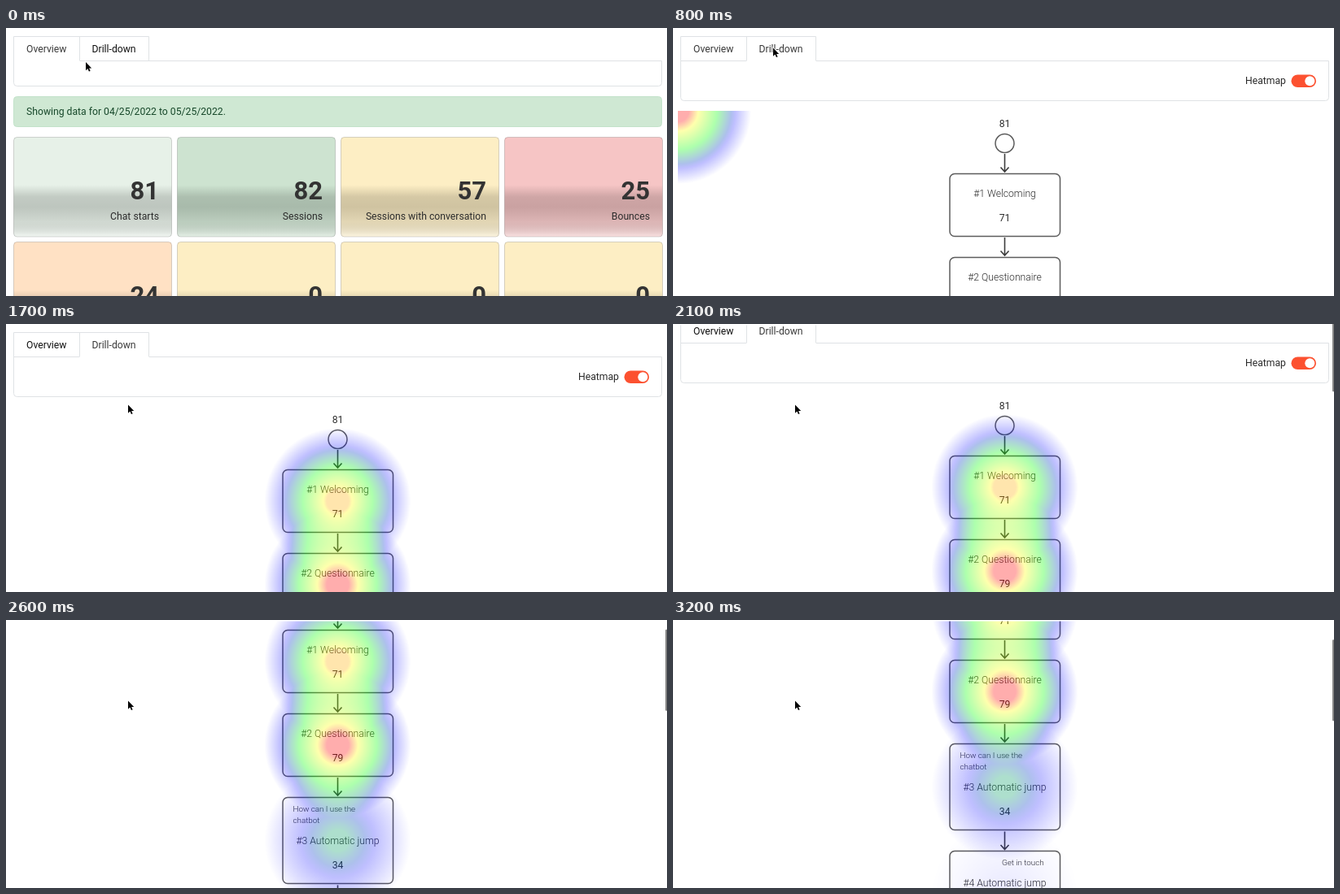
Animation of 812x330 px, one loop 3.3 s. Source, as an HTML page with a canvas:

```html
<!DOCTYPE html>
<html lang="en">
<head>
<meta charset="utf-8">
<title>Chat dashboard</title>
<style>
  html, body { margin: 0; width: 100%; height: 100%; overflow: hidden; background: #fff; }
  #stage { position: relative; width: 812px; height: 330px; overflow: hidden; background: #fff; }
  #page, #page > *, #top { position: absolute; left: 0; top: 0; }
  text { font-family: Roboto, sans-serif; font-size: 12.2px; fill: #2b2b2b; }
  .num { font-size: 31px; font-weight: 700; fill: #333; }
  .step { font-weight: 300; }
  .note { font-size: 9.8px; font-weight: 300; }
  .line { fill: none; stroke: #dfe2e5; }
  .node { fill: none; stroke: #5c5c5c; stroke-width: 1.5; }
  .arrow { fill: none; stroke: #3c3c3c; stroke-width: 1.6; }
</style>
</head>
<body>
<div id="stage">
  <div id="page">
    <svg id="art" width="812" height="640">
      <defs>
        <linearGradient id="shade" x1="0" y1="0" x2="0" y2="1">
          <stop offset=".48" stop-color="#000" stop-opacity="0"/>
          <stop offset=".6" stop-color="#000" stop-opacity=".16"/>
          <stop offset=".7" stop-color="#000" stop-opacity=".18"/>
          <stop offset=".85" stop-color="#777" stop-opacity=".2"/>
          <stop offset="1" stop-color="#fff" stop-opacity=".5"/>
        </linearGradient>
      </defs>
      <path class="line" d="M9.5 40V10.5H175.5V40M90.5 10.5V40"/>
      <path id="panel" class="line"/>
      <text id="tabA" x="25" y="30">Overview</text>
      <text id="tabB" x="105.5" y="30">Drill-down</text>
      <g id="overview"></g>
      <g id="drill"></g>
    </svg>
  </div>
  <svg id="top" width="812" height="330">
    <rect id="edge" width="812" height="1.5" fill="#fff"/>
    <rect id="bar" x="810" width="3" height="100" rx="1" fill="#858585"/>
    <path id="cursor" d="M0 0V10.2L2.4 8L3.9 11.6L5.6 10.9L4.1 7.4H7.2Z"
      fill="#000" stroke="#fff" stroke-width="1.4" paint-order="stroke"/>
  </svg>
</div>
<script>
const $ = id => document.getElementById(id);
const LOOP = 3300, STEP = 100, MID = 407.5;
const SCROLL = [17, 44, 74, 105, 138, 167, 191, 210, 220, 227, 231, 233];

const label = (x, y, s, cls = '', anchor = 'start') =>
  `<text x="${x}" y="${y}" class="${cls}" text-anchor="${anchor}">${s}</text>`;

function card(col, row, fill, n, name) {
  const x = 9.5 + col * 201, y = 134.5 + row * 129;
  const box = `x="${x}" y="${y}" width="194" height="122.5" rx="4"`;
  return `<rect ${box} fill="${fill}"/><rect ${box} fill="url(#shade)" stroke="#000" stroke-opacity=".16"/>`
    + label(x + 178.5, y + 76, n, 'num', 'end') + label(x + 178.5, y + 101.5, name, '', 'end');
}

const yellow = '#fdeec4';
$('overview').innerHTML =
  '<rect x="9.5" y="84.5" width="796" height="37" rx="4" fill="#cfe8d3" stroke="#c3e2ca"/>'
  + label(25, 107, 'Showing data for 04/25/2022 to 05/25/2022.').replace('<text', '<text style="fill:#17482a"')
  + card(0, 0, '#e7f1e8', 81, 'Chat starts')
  + card(1, 0, '#cde3d0', 82, 'Sessions')
  + card(2, 0, yellow, 57, 'Sessions with conversation')
  + card(3, 0, '#f6c5c5', 25, 'Bounces')
  + card(0, 1, '#ffe1c4', 24, '')
  + [1, 2, 3].map(c => card(c, 1, yellow, 0, '')).join('');

const center = (y, s, cls) => label(MID, y + 4.3, s, cls, 'middle');
const node = (y, h) => `<rect class="node" x="340" y="${y}" width="135.5" height="${h}" rx="6"/>`;
const arrow = y => `<path class="arrow" d="M${MID} ${y}v22m-5 -5.5l5 5.5l5 -5.5"/>`;

$('drill').innerHTML =
  label(703, 69.3, 'Heatmap')
  + '<rect x="759.5" y="57.5" width="30.5" height="15.5" rx="7.75" fill="#fc5130"/>'
  + '<circle cx="782.3" cy="65.2" r="6" fill="#fff"/>'
  + center(117.5, 81)
  + `<circle class="node" cx="${MID}" cy="142" r="11.5"/>`
  + [155, 258, 361, 493.5].map(arrow).join('')
  + node(179.5, 77) + center(203.5, '#1 Welcoming', 'step') + center(234, 71)
  + node(282.5, 77) + center(307, '#2 Questionnaire', 'step') + center(337, 79)
  + node(385.5, 106) + label(352.5, 402.5, 'How can I use the', 'note') + label(352.5, 417, 'chatbot', 'note')
  + center(439, '#3 Automatic jump', 'step') + center(469, 34)
  + node(517.5, 106) + label(404, 535, 'Get in touch', 'note')
  + center(556.5, '#4 Automatic jump', 'step');

// Heat layer: soft discs add up as alpha, then alpha picks the colour.
const RAMP = [[.25, 0, 0, 255], [.55, 0, 255, 0], [.85, 255, 255, 0], [1, 255, 0, 0]];
function heatColour(a) {
  if (a <= RAMP[0][0]) return RAMP[0].slice(1);
  const i = RAMP.findIndex(s => a <= s[0]);
  const lo = RAMP[i - 1], hi = RAMP[i], p = (a - lo[0]) / (hi[0] - lo[0]);
  return [1, 2, 3].map(k => lo[k] + (hi[k] - lo[k]) * p);
}

function heatLayer(points) {
  const R = 90, LEFT = 6, TOP = 102, MAX = 79, OPACITY = .32;
  const c = document.createElement('canvas');
  c.width = 802;
  c.height = 538;
  c.style.left = LEFT + 'px';
  c.style.top = TOP + 'px';
  const g = c.getContext('2d');
  for (const [px, py, v] of points) {
    const x = px - LEFT, y = py - TOP;
    const disc = g.createRadialGradient(x, y, R * .15, x, y, R);
    disc.addColorStop(0, 'rgba(0,0,0,1)');
    disc.addColorStop(1, 'rgba(0,0,0,0)');
    g.globalAlpha = v / MAX;
    g.fillStyle = disc;
    g.fillRect(x - R, y - R, 2 * R, 2 * R);
  }
  const img = g.getImageData(0, 0, c.width, c.height), d = img.data;
  const palette = Array.from({ length: 256 }, (_, i) => heatColour(i / 255));
  for (let i = 3; i < d.length; i += 4) {
    const a = d[i];
    if (!a) continue;
    [d[i - 3], d[i - 2], d[i - 1]] = palette[a];
    d[i] = Math.min(a, OPACITY * 255);
  }
  g.putImageData(img, 0, 0);
  $('page').append(c);
  return c;
}

const unplaced = heatLayer([[6, 102, 79]]);
const placed = heatLayer([[MID, 218, 71], [MID, 321, 79], [MID, 438.5, 34], [MID, 570.5, 6]]);

const show = (el, on) => { el.style.display = on ? '' : 'none'; };
const ease = p => p * p * (3 - 2 * p);

function pointer(k) {
  if (k >= 17) return [150, 99.5];
  if (k === 16) return [137, 63];
  const p = ease(Math.min(k / 5, 1));
  return [98 + 25 * p, 42 - 17.5 * p];
}

function draw(ms) {
  const k = Math.floor((ms % LOOP) / STEP);
  const drill = k >= 8, scrolling = k >= 21;
  const y = scrolling ? SCROLL[k - 21] : 0;

  show($('overview'), !drill);
  show($('drill'), drill);
  show(unplaced, k === 8);
  show(placed, k > 8);
  show($('bar'), scrolling);
  show($('edge'), scrolling);

  const bottom = drill ? 89.5 : 71.5;
  const gap = drill ? 'M9.5 40.5H90.5M175.5 40.5' : 'M90.5 40.5';
  $('panel').setAttribute('d',
    `${gap}H805.5V${bottom - 4}q0 4 -4 4H13.5q-4 0 -4 -4V40`);
  $('tabA').style.fill = k > 8 ? '#111' : '#3a3a3a';
  $('tabB').style.fill = drill ? '#3a3a3a' : '#111';

  $('page').style.transform = `translateY(${-y}px)`;
  $('bar').setAttribute('y', -20 + .19 * y);
  $('cursor').setAttribute('transform', `translate(${pointer(k)})`);
}

const start = performance.now();
function tick() {
  draw(performance.now() - start);
  requestAnimationFrame(tick);
}
tick();
</script>
</body>
</html>
```
